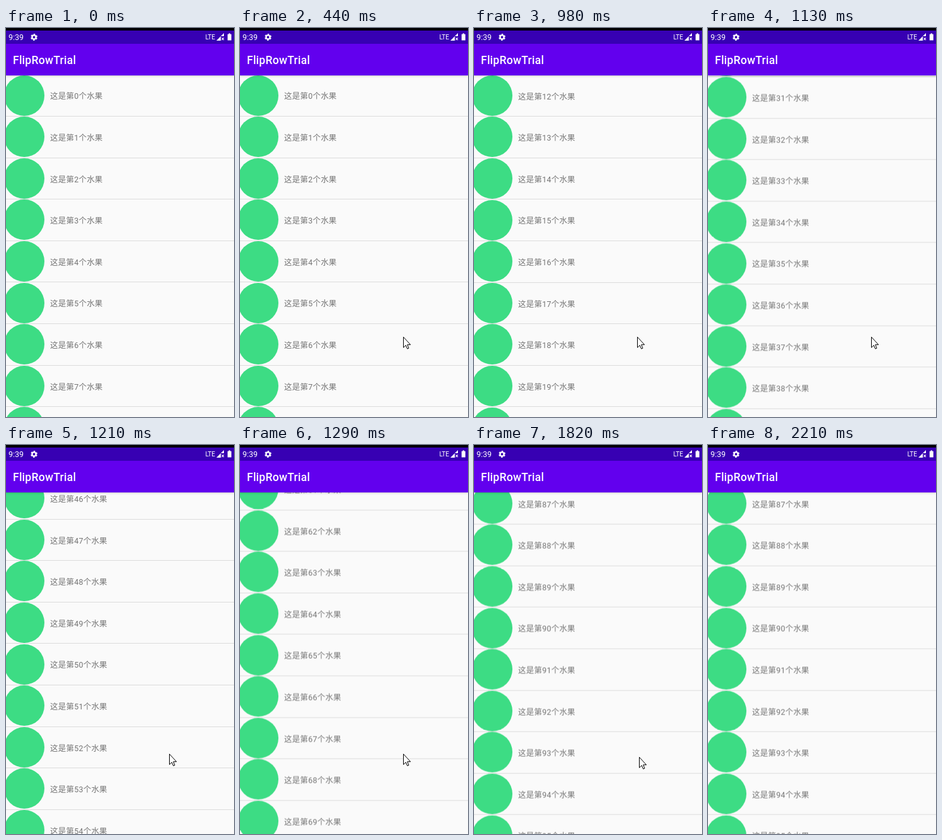
An HTML page that plays this animation: 362 by 615 pixels, repeating every 2590 ms.

```html
<!DOCTYPE html>
<html lang="zh-CN">
<head>
<meta charset="utf-8">
<title>FlipRowTrial</title>
<style>
  html, body { margin: 0; width: 100%; height: 100%; overflow: hidden; }
  body { background: #fafafa; font-family: Roboto, "Noto Sans CJK SC", "Noto Sans CJK", sans-serif; }
  .stage { position: relative; width: 362px; height: 615px; overflow: hidden; background: #fafafa; }
  .stage > * { position: absolute; }

  .status { left: 0; top: 0; width: 362px; height: 21px; border-top: 4px solid #000; background: #3700b3; color: #fff; z-index: 2; }
  .status span { position: absolute; line-height: 22px; }
  .clock { left: 4px; font-size: 12.4px; }
  .net { left: 316.4px; top: 0; font-size: 10.2px; letter-spacing: -.2px; }
  .icons { left: 0; top: 0; z-index: 3; }
  .bar { left: 0; top: 25px; width: 362px; height: 50px; background: #6200ee; color: #fff; z-index: 1;
    box-shadow: 0 1px 3px rgba(0, 0, 0, .2); }
  .bar b { position: absolute; left: 11px; line-height: 52px; font-size: 17.6px; font-weight: 500; letter-spacing: .0125em; }

  .list { left: 0; top: 74.4px; width: 362px; animation: scroll 2590ms step-end infinite; }
  .row { position: absolute; left: 0; width: 362px; height: 65.6px; color: #757575;
    font-size: 12.5px; letter-spacing: .0178em; line-height: 67px; white-space: nowrap; }
  .row::before { content: ""; position: absolute; left: -3px; top: .3px; width: 64px; height: 64px; border-radius: 50%; background: #3ddc84; }
  .row::after { content: ""; position: absolute; left: 0; bottom: 0; width: 100%; height: 1px; background: #dcdcdc; }
  .row span { position: absolute; left: 70px; }

  .cursor { left: 0; top: 0; z-index: 4; overflow: visible; animation: pointer 2590ms step-end infinite; }

  @keyframes scroll {
    0% { transform: translateY(0); }
    31.66% { transform: translateY(-90px); }
    34.74% { transform: translateY(-380px); }
    37.83% { transform: translateY(-787px); }
    40.54% { transform: translateY(-1345px); }
    43.62% { transform: translateY(-2030.6px); }
    46.71% { transform: translateY(-3040px); }
    49.8% { transform: translateY(-4038.5px); }
    52.5% { transform: translateY(-4600px); }
    55.59% { transform: translateY(-5156.8px); }
    58.68%, 100% { transform: translateY(-5721.4px); }
  }
  @keyframes pointer {
    0% { transform: translate(286px, 640px); }
    2.7% { transform: translate(286px, 585px); }
    5.79% { transform: translate(276px, 556px); }
    8.49% { transform: translate(266px, 527px); }
    11.19% { transform: translate(258px, 505px); }
    14.28% { transform: translate(257px, 492px); }
    16.98% { transform: translate(259px, 488px); }
    70.27% { transform: translate(262px, 493px); }
    73.35% { transform: translate(274px, 511px); }
    76.44% { transform: translate(295px, 541px); }
    79.15% { transform: translate(321px, 575px); }
    82.23% { transform: translate(344px, 604px); }
    85.32%, 100% { transform: translate(344px, 640px); }
  }
</style>
</head>
<body>
<div class="stage">
  <div class="list" id="list"></div>
  <div class="status"><span class="clock">9:39</span><span class="net">LTE</span></div>
  <div class="bar"><b>FlipRowTrial</b></div>
  <svg class="icons" width="362" height="26" fill="none" stroke="#fff">
    <!-- gear -->
    <circle cx="44.5" cy="14.5" r="3.1" stroke-width="2.4"/>
    <circle cx="44.5" cy="14.5" r="4.7" stroke-width="1.4" stroke-dasharray="2.6 2.32" stroke-dashoffset="-1.16"/>
    <!-- signal -->
    <path d="M334 20L346 8V13H341V20Z" fill="#fff" stroke="none"/>
    <path d="M342.4 15.4l3.6 3.8M346 15.4l-3.6 3.8" stroke-width="1.1"/>
    <!-- battery -->
    <path d="M351.8 9.7H353.6V8.5H356V9.7H357.8V19.6H351.8Z" fill="#fff" stroke="none"/>
  </svg>
  <svg class="cursor" width="13" height="20">
    <path d="M.5 .6V17.2L4.3 13.6 6.7 19.2 9 18.2 6.7 12.7H11.7Z" fill="#fff" stroke="#000"/>
  </svg>
</div>
<script>
  const pitch = 65.6;
  const list = document.getElementById("list");
  for (let i = 0; i < 100; i++) {
    const row = document.createElement("div");
    const label = document.createElement("span");
    row.className = "row";
    row.style.top = i * pitch + "px";
    label.textContent = `这是第${i}个水果`;
    row.append(label);
    list.append(row);
  }
</script>
</body>
</html>
```
